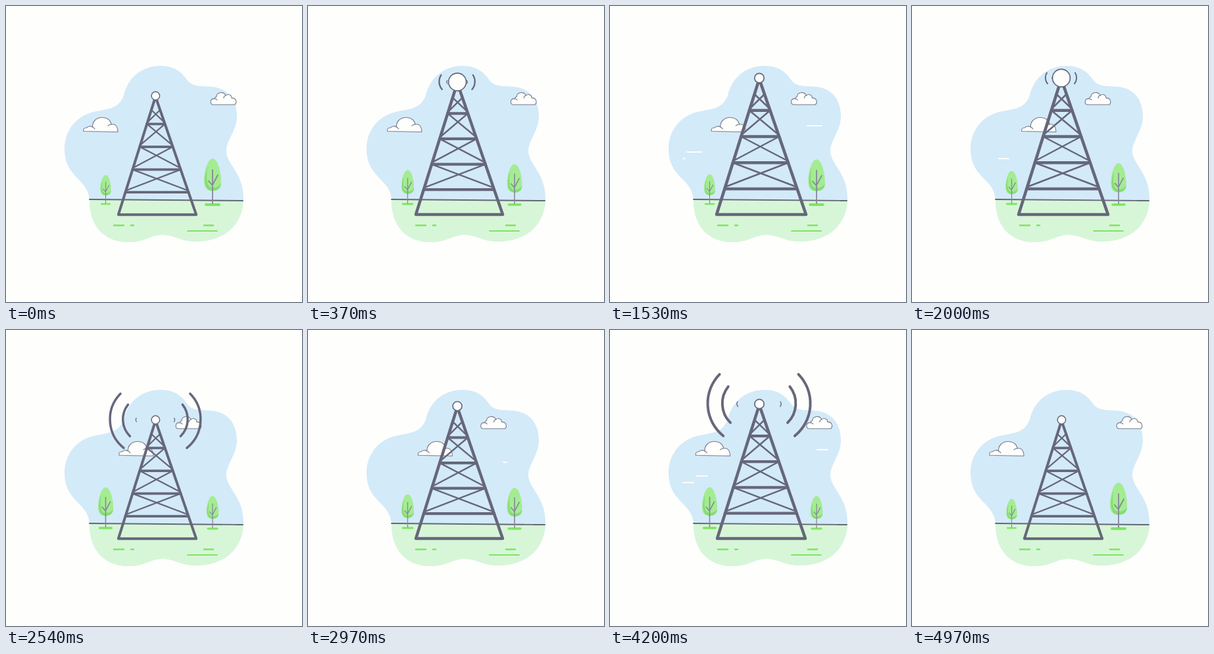
Animation of 450 by 450 pixels, one loop 5 s. Source, as an HTML page:

```html
<!DOCTYPE html>
<html lang="en">
<head>
<meta charset="utf-8">
<title>Radio tower</title>
<style>
  html, body { margin: 0; width: 100%; height: 100%; overflow: hidden; background: #fefefc; }
  svg { display: block; width: 100vw; height: 100vh; }
</style>
</head>
<body>
<svg viewBox="0 0 450 450" fill="none" stroke-linecap="round" stroke-linejoin="round">
  <defs>
    <path id="blob" d="M235 91C258 91 268 102 276 113C284 124 300 121 316 123C340 127 351 145 351 168C351 190 334 205 335 222C337 242 361 255 361 292C361 330 335 358 288 358C265 358 258 348 238 348C218 348 212 359 186 359C150 359 127 335 127 296C126 262 89 262 89 217C89 185 112 164 138 160C160 156 172 154 179 136C185 110 205 91 235 91Z"/>
    <clipPath id="inside"><use href="#blob"/></clipPath>
    <g id="tree">
      <path d="M0-70C8-70 13-49 13-36C13-25 8-21 0-21C-8-21-13-25-13-36C-13-49-8-70 0-70Z" fill="#a4ec92"/>
      <path d="M-8-57C-14-40-13-21 0-21C8-21 13-25 13-33C10-27 5-26 0-26C-9-26-10-38-8-57Z" fill="#86dc74"/>
      <path d="M-10 0H10" stroke="#7fe562" stroke-width="4"/>
      <path d="M0-2V-53M0-30L8-45M0-29L-6-36" stroke="#87879a" stroke-width="1.8"/>
    </g>
  </defs>
  <use href="#blob" fill="#d3eaf9"/>
  <path d="M80 294L370 296V370H80Z" fill="#d7f6d8" clip-path="url(#inside)"/>
  <path d="M127 294L360 296" stroke="#666776" stroke-width="1.9"/>
  <g stroke="#7fe562" stroke-width="2.5">
    <path d="M164 333.5H179M190 333.5H194M301 333.5H315"/>
    <path d="M276 342H321" stroke-width="1.8"/>
  </g>
  <g id="streaks" stroke="#fefefc" stroke-width="2"></g>
  <g fill="#fefefc" stroke="#777a8a" stroke-width="1.1">
    <g id="cloudLeft">
      <path d="M118 190.5C117 187 119 184.5 123 185C124 183 129 182 131.5 184C131 176 137 169.5 146 169.5C154 169.5 159.5 174 160 180C166 178.5 170 183 170 191.5Z"/>
      <path d="M131.5 184Q134 185 135 187M160 180Q157 180 155 182" fill="none"/>
    </g>
    <g id="cloudRight">
      <path d="M314 150C309 148 311 140 317 141C318 138 319 138 320 138C320 131 331 129 334 136C338 133 343 135 343 140C349 139 352 146 348 150Z"/>
      <path d="M317 141Q320 141 321 143M334 136Q331 137 331 140" fill="none"/>
    </g>
  </g>
  <use id="treeLeft" href="#tree"/>
  <use id="treeRight" href="#tree"/>
  <g id="tower" stroke="#66677a">
    <path d="M225 117L162 317H298L229 117" stroke-width="4.6"/>
    <g id="lattice"></g>
    <g id="waves"></g>
    <circle id="ball" cx="227" cy="109.5" fill="#fefefc" stroke-width="1.7"/>
  </g>
</svg>
<script>
const LOOP = 5000, PULSE = LOOP / 3, GUST = LOOP / 2;
const $ = id => document.getElementById(id);
const clamp = x => Math.max(0, Math.min(1, x));
const wave = p => (1 - Math.cos(2 * Math.PI * p)) / 2;
const ease = (t, start, end) => wave(clamp((t - start) / (end - start)) / 2);
const mix = (a, b, k) => a + (b - a) * k;

function add(parent, d, width) {
  const path = document.createElementNS('http://www.w3.org/2000/svg', 'path');
  path.setAttribute('d', d);
  if (width) path.setAttribute('stroke-width', width);
  return parent.appendChild(path);
}

// Evenly spaced rungs with crossed diagonals above each
const legLeft = y => mix(225, 162, (y - 117) / 200);
const legRight = y => mix(229, 298, (y - 117) / 200);
const GAP = 39.75;
for (let i = 0; i < 4; i++) {
  const y = 278 - i * GAP, top = Math.max(134, y - GAP), foot = y - 3;
  add($('lattice'), `M${legLeft(top)} ${top}L${legRight(foot)} ${foot}M${legRight(top)} ${top}L${legLeft(foot)} ${foot}`, 2.5);
  add($('lattice'), `M${legLeft(y)} ${y}H${legRight(y)}`, 4.3);
}

// Radio arcs, outermost first: each grows outwards, then shrinks in place
const arcs = [0, 1, 2].map(() => add($('waves'), ''));

function drawArc(path, i, p) {
  const grow = ease(p, .08 + .08 * i, .52 - .04 * i);
  const fadeAt = .58 - .065 * i;
  const h = (47.5 - 19.5 * i) * grow * (1 - ease(p, fadeAt, fadeAt + .13));
  if (h < .4) return path.setAttribute('d', '');
  const dist = mix(12, 79 - 22.5 * i, grow);
  const sag = h * (.3 + .003 * h), r = (h * h + sag * sag) / (2 * sag);
  const cy = 109.5 + h * .035, tilt = h * .06;
  path.setAttribute('d', [-1, 1].map(side => {
    const x = inset => 226.5 + side * (dist - inset);
    return `M${x(sag - tilt)} ${cy - h}A${r} ${r} 0 0 ${side > 0 ? 1 : 0} ${x(sag + tilt)} ${cy + h}`;
  }).join(''));
  path.setAttribute('stroke-width', Math.min(4, .9 + .13 * h));
}

// Wind streaks run to the right, the tail following the head
const streaks = [
  { x: 297, y: 201, start: 330 },
  { x: 308, y: 190.5, start: 530 },
  { x: 295, y: 182, start: 1130 },
  { x: 112, y: 222, start: 1130 },
  { x: 111, y: 232, start: 1420 }
].map(s => ({ ...s, path: add($('streaks'), '') }));

function drawStreak({ x, y, start, path }, t) {
  const head = ease(t, start, start + 600), tail = ease(t, start + 250, start + 850);
  path.setAttribute('d', head - tail > .02 ? `M${x + 36 * tail} ${y}H${x + 36 * head}` : '');
}

const place = (id, x, y, scale) => $(id).setAttribute('transform', `translate(${x} ${y}) scale(${scale})`);

function draw(t) {
  const pulse = t / PULSE % 1, sway = wave(pulse), drift = wave(t / LOOP);
  place('cloudLeft', 54 * drift, 0, 1);
  place('cloudRight', -53 * drift, 0, 1);
  place('treeLeft', 151.5, 301, mix(.63, .885, sway));
  place('treeRight', 314, 302, mix(1, .71, sway));

  const rise = ease(t, 20, 530) - ease(t, 2080, 2530) + ease(t, 2630, 3130) - ease(t, 4080, 4640);
  const s = mix(.87, 1, rise);
  place('tower', 230 * (1 - s), 318 * (1 - s), s);

  const swell = wave(clamp((pulse - .09) / .26));
  $('ball').setAttribute('r', 7.2 + 6.6 * swell);
  arcs.forEach((path, i) => drawArc(path, i, pulse));
  streaks.forEach(streak => drawStreak(streak, t % GUST));
}

const began = performance.now();
function tick() {
  draw((performance.now() - began) % LOOP);
  requestAnimationFrame(tick);
}
tick();
</script>
</body>
</html>
```
